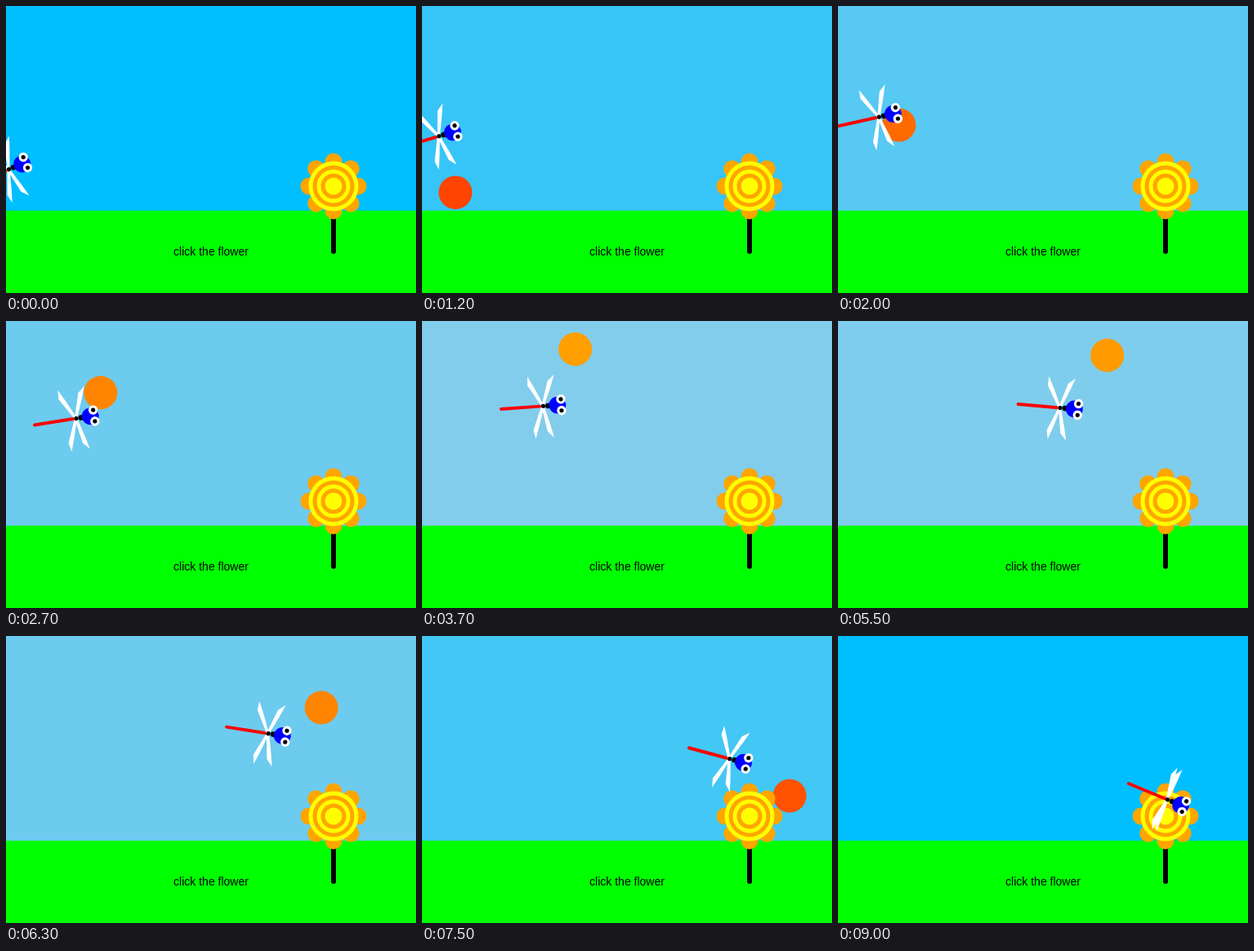
Animation of 502x352 px, one loop 9.1 s. Source, as an HTML page with a canvas:

```html
<!DOCTYPE html>
<html>
<head>
<meta charset="utf-8">
<style>
html, body { margin: 0; width: 100%; height: 100%; overflow: hidden; }
canvas { display: block; }
</style>
</head>
<body>
<canvas id="stage" width="502" height="352"></canvas>
<script>
const ctx = document.getElementById('stage').getContext('2d');
const LAST = 90, STEP = 100, RAD = Math.PI / 180;

function disc(x, y, r, color) {
  ctx.fillStyle = color;
  ctx.beginPath();
  ctx.arc(x, y, r, 0, 2 * Math.PI);
  ctx.fill();
}

function line(x1, y1, x2, y2, width, color) {
  ctx.strokeStyle = color;
  ctx.lineWidth = width;
  ctx.lineCap = 'round';
  ctx.beginPath();
  ctx.moveTo(x1, y1);
  ctx.lineTo(x2, y2);
  ctx.stroke();
}

function mix(from, to, k) {
  return `rgb(${from.map((v, i) => Math.round(v + (to[i] - v) * k))})`;
}

function flower(x, y) {
  line(x, y, x, y + 80, 6, '#000');
  for (let a = 0; a < 360; a += 45)
    disc(x + 30 * Math.cos(a * RAD), y + 30 * Math.sin(a * RAD), 10.5, '#ffa500');
  for (let i = 0; i < 5; i++)
    disc(x, y, 30.5 - 5 * i, i % 2 ? '#ffa500' : '#ff0');
}

// side is 1 for an upper wing, -1 for a lower one
function wing(angle, side) {
  ctx.save();
  ctx.scale(1, side);
  ctx.rotate(angle * RAD);
  ctx.fillStyle = '#fff';
  ctx.beginPath();
  ctx.moveTo(-1.5, 0);
  ctx.lineTo(-5, -31);
  ctx.lineTo(0, -41);
  ctx.lineTo(1, -25);
  ctx.lineTo(1.5, 0);
  ctx.fill();
  ctx.restore();
}

function dragonfly(x, y, angle, folded) {
  ctx.save();
  ctx.translate(x, y);
  ctx.rotate(angle * RAD);
  line(-51, 0, 0, 0, 4, '#f00');
  const upper = folded ? 4.5 : 23.5, lower = folded ? 4 : 16;
  for (const s of [-1, 1]) {
    wing(s * upper, 1);
    wing(s * lower, -1);
  }
  disc(0.5, 0, 2.6, '#000');
  disc(6.5, 0, 3.3, '#000');
  disc(18, 0, 10.5, '#00f');
  for (const ey of [-7, 7]) {
    disc(22.6, ey, 5.7, '#fff');
    disc(22.6, ey, 2.6, '#000');
  }
  ctx.restore();
}

function draw(n) {
  const turn = Math.PI * n / LAST;
  const c = Math.cos(turn), s = Math.sin(turn);

  ctx.fillStyle = mix([0, 191, 255], [135, 206, 235], s);
  ctx.fillRect(0, 0, 502, 352);
  disc(251 - 230 * c, 371 - 350 * s, 20.5, mix([255, 0, 0], [255, 165, 0], s));
  ctx.fillStyle = '#0f0';
  ctx.fillRect(0, 251, 502, 101);

  ctx.fillStyle = '#000';
  ctx.font = '14px "Liberation Sans", Arial, sans-serif';
  ctx.textAlign = 'center';
  ctx.fillText('click the flower', 251, 306);

  flower(401, 221);
  dragonfly(203 - 200 * c, 200.5 - 100 * s, n / 2 - 22.5, n === LAST);
}

function tick() {
  draw(Math.floor(performance.now() / STEP) % (LAST + 1));
  requestAnimationFrame(tick);
}
tick();
</script>
</body>
</html>
```
